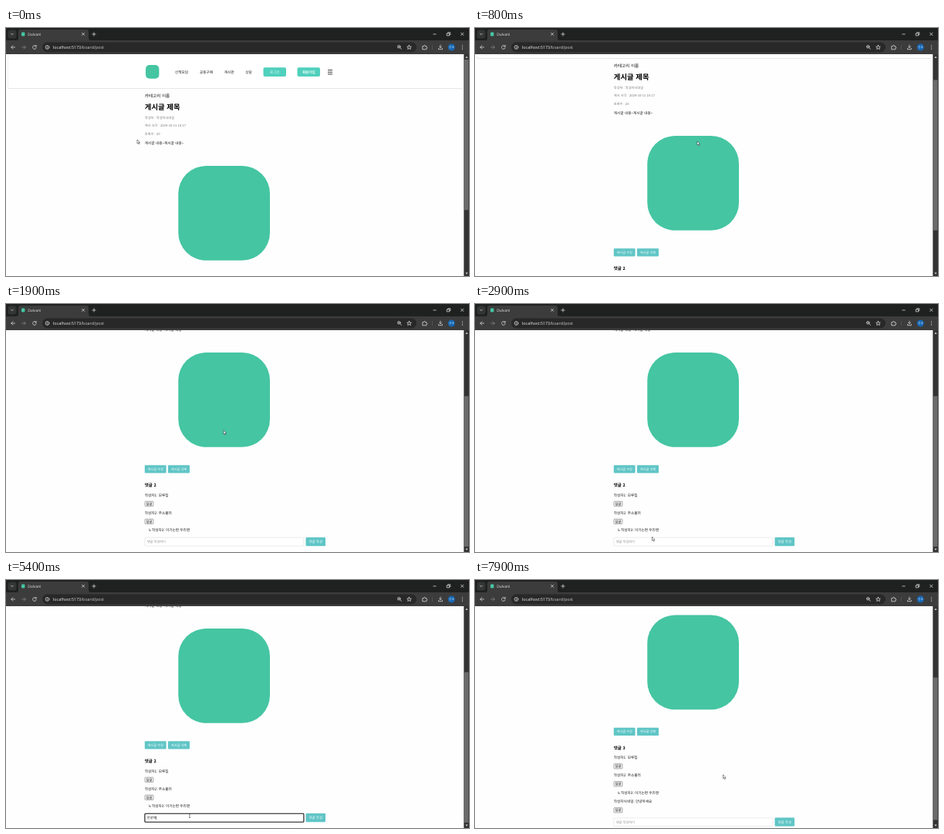
Animation, 600 px wide and 322 px high, one loop 8 s. Source, as an HTML page:

```html
<!DOCTYPE html>
<html lang="ko">
<head>
<meta charset="utf-8">
<title>Board post</title>
<style>
  html, body { margin: 0; width: 100%; height: 100%; overflow: hidden; background: #fff; }
  svg { display: block; width: 600px; height: 322px; }
  text { font-family: "Noto Sans CJK KR", "Noto Sans CJK", "Noto Sans", "DejaVu Sans", sans-serif;
         text-rendering: geometricPrecision; white-space: pre; }
  .ui text { font-family: "Noto Sans", "Noto Sans CJK KR", sans-serif; }
  .ico { fill: none; stroke: #d6d6d6; stroke-width: .8; stroke-linecap: round; stroke-linejoin: round; }
</style>
</head>
<body>
<svg id="stage" viewBox="0 0 600 322">
  <rect width="600" height="322" fill="#fefefe"/>
  <g id="page"></g>

  <g id="bar">
    <rect x="593.3" y="34" width="6.7" height="288" fill="#333"/>
    <rect id="thumb" x="594" width="5.4" fill="#6b6b6b"/>
    <path d="M595.4 39 L597 36.6 L598.6 39Z M595.4 317.6 L597 320 L598.6 317.6Z" fill="#c4c4c4"/>
  </g>

  <g class="ui">
    <rect width="600" height="17" fill="#1f2020"/>
    <path d="M12 16.5 Q16 16.5 16 12.5 V5 Q16 2 19 2 H104 Q107 2 107 5 V12.5 Q107 16.5 111 16.5Z" fill="#3c3c3c"/>
    <rect y="16" width="600" height="18" fill="#3c3c3c"/>
    <rect x="2.5" y="2.5" width="11" height="11" rx="3.2" fill="#343535"/>
    <rect x="47" y="18.5" width="485" height="13" rx="6.5" fill="#282828"/>
    <rect x="20" y="5.6" width="4.4" height="4.8" rx="1.2" fill="#45c5a2"/>
    <text x="28.3" y="10" font-size="4.8" fill="#e3e3e3">Dulvani</text>
    <text x="61" y="27" font-size="5.33" fill="#e8e8e8">localhost:5173<tspan fill="#c4c4c4">/board/post</tspan></text>
    <g class="ico">
      <path d="M6.6 7.3 L8 8.7 L9.4 7.3"/>
      <path d="M98.6 6.4 l3 3 m0 -3 l-3 3"/>
      <path d="M114 5.8 v4.4 m-2.2 -2.2 h4.4"/>
      <path d="M553.8 8 h3.4"/>
      <path d="M571.6 6.9 h3 v3 h-3z M572.8 6.8 v-1 h3 v3 h-1"/>
      <path d="M589.6 6.2 l3.4 3.4 m0 -3.4 l-3.4 3.4"/>
      <path d="M11.6 25 h-4.8 m2.2 -2.2 l-2.2 2.2 l2.2 2.2"/>
      <path d="M20.6 25 h4.8 m-2.2 -2.2 l2.2 2.2 l-2.2 2.2" stroke="#858585"/>
      <path d="M38.9 23.6 A2.4 2.4 0 1 0 39.3 25.6 M39.2 22.4 v1.6 h-1.6"/>
      <circle cx="53.5" cy="25" r="2.4"/>
      <path d="M53.5 24.9 v1.2 M53.5 23.7 v.1"/>
      <circle cx="509.3" cy="24.3" r="1.8"/>
      <path d="M510.7 25.7 l1.8 1.8 M508.5 24.3 h1.6"/>
      <path d="M522.5 22.3 l.8 1.8 2 .2 -1.5 1.3 .5 2 -1.8 -1.1 -1.8 1.1 .5 -2 -1.5 -1.3 2 -.2z"/>
      <path d="M540.2 23.6 h1.5 q0 -1.2 .8 -1.2 t.8 1.2 h1.5 v1.4 q1.1 0 1.1 .7 t-1.1 .7 v1.4 h-4.6z"/>
      <path d="M563 22.2 v3.4 m-1.5 -1.4 l1.5 1.5 l1.5 -1.5 M560.6 26.4 v1.3 h4.8 v-1.3"/>
    </g>
    <path d="M552.5 22 v6" stroke="#5d6470" stroke-width=".5"/>
    <circle cx="577.3" cy="25" r="4.5" fill="#1767b3"/>
    <text x="577.3" y="26.3" font-size="3.4" fill="#dce9f5" text-anchor="middle">온새</text>
    <g fill="#d6d6d6">
      <circle cx="591.5" cy="22.8" r=".6"/><circle cx="591.5" cy="25" r=".6"/><circle cx="591.5" cy="27.2" r=".6"/>
    </g>
  </g>

  <g id="cursor">
    <path id="arrow" d="M0 0 V5 L1.2 4 L2 5.9 L2.9 5.5 L2.1 3.7 H3.6Z" fill="#fff" stroke="#222" stroke-width=".5"/>
    <path id="ibeam" d="M-1 -2.3 h2 M0 -2.3 v4.8 M-1 2.5 h2" fill="none" stroke="#333" stroke-width=".6"/>
    <path id="hand" d="M-.5 0 Q0 -.6 .5 0 V2.2 L2.6 2.8 Q3.1 3 3 3.8 L2.5 6.4 H-.5 L-2.1 3.9 Q-1.8 3 -.5 4Z" fill="#fff" stroke="#222" stroke-width=".5"/>
  </g>
</svg>

<script>
const LOOP = 8000, STEP = 100, VIEW = 288, TRACK = 274, ROW = 23;
const TEAL = '#60c5c6', MINT = '#50d0bd', LOGO = '#45c5a2';
const $ = id => document.getElementById(id);
const page = $('page');

function add(parent, tag, attrs, content) {
  const el = document.createElementNS('http://www.w3.org/2000/svg', tag);
  for (const k in attrs) el.setAttribute(k, attrs[k]);
  if (content) el.textContent = content;
  parent.appendChild(el);
  return el;
}
const box = (g, x, y, w, h, fill, rx = 0, more = {}) =>
  add(g, 'rect', { x, y, width: w, height: h, rx, fill, ...more });
// y is the middle of the line
const label = (g, x, y, s, size = 4.65, fill = '#111', weight = 500, anchor = 'start') =>
  add(g, 'text', { x, y: y + size * .36, 'font-size': size, fill, 'font-weight': weight, 'text-anchor': anchor }, s);
function button(g, x, y, w, h, s, size, fill, rx, weight = 500) {
  box(g, x, y, w, h, fill, rx);
  label(g, x + w / 2, y + h / 2, s, size, '#fff', weight, 'middle');
}
function comment(g, y, s) {
  label(g, 179.8, y, s);
  box(g, 180, y + 8.2, 11, 6.3, '#efefef', .8, { stroke: '#666', 'stroke-width': .5 });
  label(g, 185.5, y + 11.3, '답글', 4.2, '#000', 500, 'middle');
}

// Header
box(page, 2, 20, 590, 58.8, '#dedede', 1);
box(page, 2.4, 20, 589.2, 57.9, '#fff', 1);
box(page, 181, 48, 17.4, 17.8, LOGO, 5);
[[219, '산책모임'], [251, '공동구매'], [282.7, '게시판'], [310.3, '상담']]
  .forEach(([x, s]) => label(page, x, 57.2, s));
button(page, 333.5, 51.2, 29.5, 11.8, '로그인', 4.5, MINT, 2);
button(page, 377.5, 51.2, 29.5, 11.8, '회원가입', 4.5, MINT, 2, 700);
add(page, 'path', { d: 'M417 54.7 h6 m-6 2.6 h6 m-6 2.6 h6', stroke: '#222', 'stroke-width': .9 });

// Post
label(page, 179.8, 88.2, '카테고리 이름', 5.6);
label(page, 179.8, 102.3, '게시글 제목', 9.4, '#000', 700);
label(page, 179.8, 116.2, '작성자 : 작성자닉네임', 4.2, '#777');
label(page, 179.8, 126.7, '게시 시각 : 2024-10-11 16:17', 4.2, '#777');
label(page, 179.8, 137.2, '조회수 : 20', 4.2, '#777');
label(page, 179.8, 149.5, '게시글 내용~게시글 내용~');
box(page, 223.3, 179, 118.7, 122.8, LOGO, 36);
button(page, 179.8, 325.3, 27.8, 10.3, '게시글 수정', 4.2, TEAL, 1);
button(page, 210, 325.3, 28, 10.3, '게시글 삭제', 4.2, TEAL, 1);

// Comments
const count = label(page, 179.8, 351.5, '댓글 2', 5.5, '#000', 700);
comment(page, 364, '작성자1: 모루칩');
comment(page, 387, '작성자2: 주소불러');
label(page, 184.6, 409.6, '↳');
label(page, 189, 409.6, '작성자3: 이기는편 우리편');
const added = add(page, 'g', {});
comment(added, 421, '작성자닉네임: 안녕하세요');

// Form
const form = add(page, 'g', {});
const field = box(form, 179.9, 419.3, 206, 10.9, '#fff', 1);
const typed = label(form, 182.7, 424.7, '', 4.2);
const caret = box(form, 183, 422.3, .5, 4.8, '#111');
button(form, 388.5, 419, 25.5, 11.2, '댓글 작성', 4.4, TEAL, 1);

// [time, value...] tables
const SCROLL = [[500, 0], [600, 9], [700, 31], [800, 39], [900, 39], [1000, 76], [1100, 106.4], [1200, 116],
  [7700, 116], [7800, 124], [7900, 133.5]];
const POINTER = [[100, 170, 145], [600, 288, 147], [1800, 288, 147], [2300, 258, 232], [2700, 232, 299],
  [2900, 229.5, 302.3], [3200, 237, 309], [3500, 237, 309], [4000, 238, 306], [6200, 238, 306],
  [6500, 330, 307], [6800, 445, 312], [7100, 405, 309.8], [7300, 405, 309.8], [7700, 321.5, 252.8]];
const TYPING = [[0, ''], [4500, 'ㅇ'], [4600, '아'], [4700, '안'], [4800, '안ㄴ'], [5100, '안녀'], [5200, '안녕'],
  [5400, '안녕하'], [5500, '안녕하세'], [5600, '안녕하세ㅇ'], [5700, '안녕하세요'], [7400, '']];
const CARET = [[0, 0], [3200, 1], [3600, 0], [4200, 1], [6300, 0], [6800, 1], [7200, 0]];

const held = (table, t) => table.filter(r => r[0] <= t).pop()[1];
function along(table, t, col = 1) {
  const i = table.findIndex(r => r[0] > t);
  if (i === 0) return table[0][col];
  if (i < 0) return table[table.length - 1][col];
  const a = table[i - 1], b = table[i];
  return a[col] + (b[col] - a[col]) * (t - a[0]) / (b[0] - a[0]);
}
const show = (el, on) => el.setAttribute('visibility', on ? 'visible' : 'hidden');

function draw(now) {
  const t = Math.floor(now % LOOP / STEP) * STEP;
  const sent = t >= 7400, focus = t >= 3200 && t < 7200;
  const shift = sent ? ROW : 0;
  const scroll = along(SCROLL, t);

  page.setAttribute('transform', `translate(0 ${-scroll})`);
  const height = 404 + shift;
  $('thumb').setAttribute('y', 41 + TRACK * scroll / height);
  $('thumb').setAttribute('height', TRACK * VIEW / height);

  count.textContent = sent ? '댓글 3' : '댓글 2';
  show(added, sent);
  form.setAttribute('transform', `translate(0 ${shift})`);
  field.setAttribute('stroke', focus ? '#111' : '#d8d8d8');
  field.setAttribute('stroke-width', focus ? 1.1 : .5);

  const text = held(TYPING, t);
  typed.textContent = text || '댓글 작성하기';
  typed.setAttribute('fill', text ? '#111' : '#858585');
  caret.setAttribute('x', 182.8 + text.length * 4.2 * .92);
  show(caret, held(CARET, t));

  const x = along(POINTER, t), y = along(POINTER, t, 2);
  const top = 419 + shift - scroll;
  const inRow = y >= top && y <= top + 11.2;
  const kind = !inRow ? 'arrow' : x > 180 && x < 386 ? 'ibeam' : x > 388 && x < 414 ? 'hand' : 'arrow';
  for (const id of ['arrow', 'ibeam', 'hand']) show($(id), id === kind);
  $('cursor').setAttribute('transform', `translate(${x} ${y})`);
}

const start = performance.now();
function tick() {
  draw(performance.now() - start);
  requestAnimationFrame(tick);
}
tick();
</script>
</body>
</html>
```
